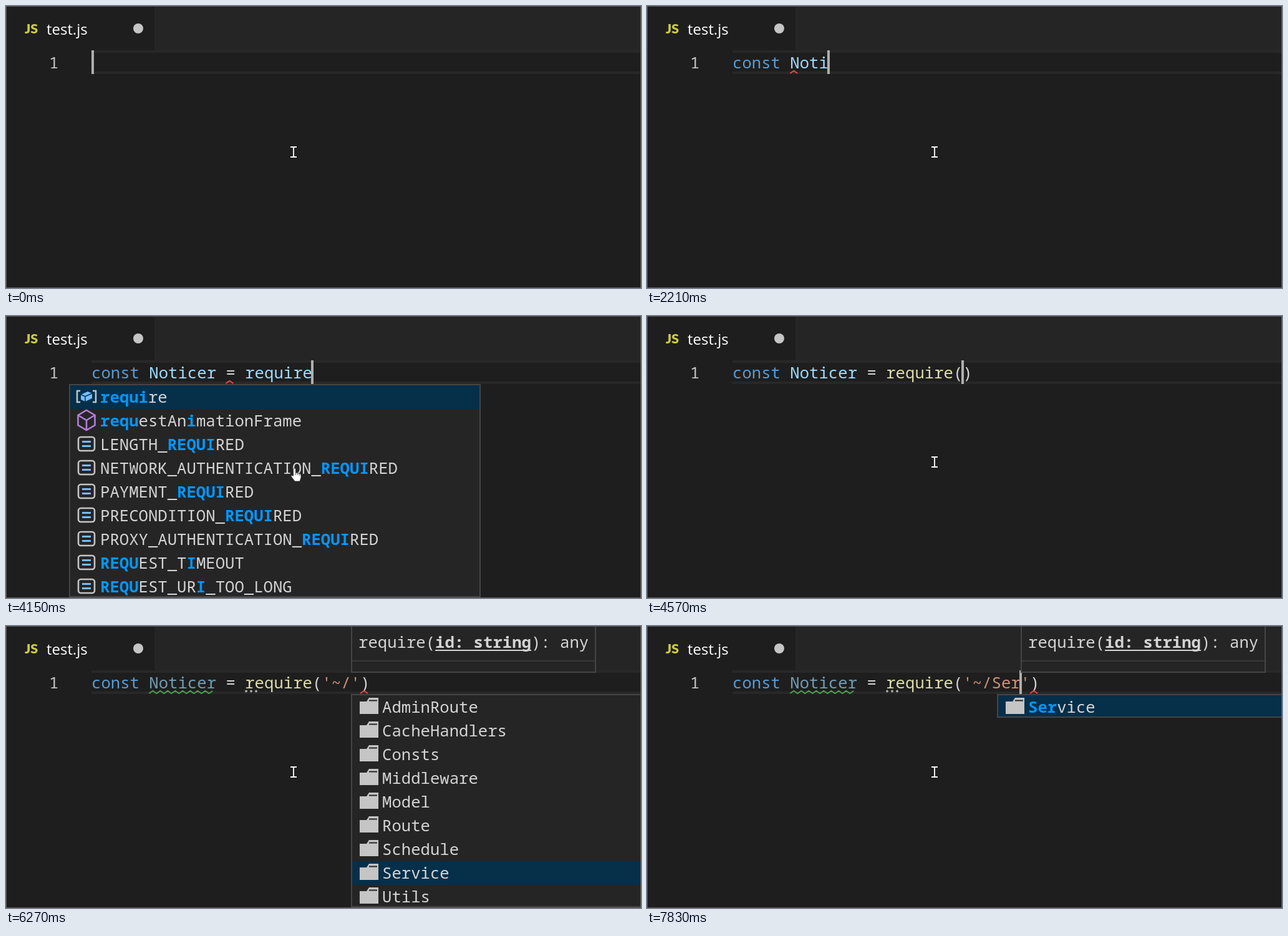
Write an HTML page that moves like this. It is 1018 px wide and 452 px high and loops after 8 s.

```html
<!DOCTYPE html>
<html lang="en">
<head>
<meta charset="utf-8">
<title>Editor completion</title>
<style>
  html, body { margin: 0; width: 100%; height: 100%; overflow: hidden; background: #1e1e1e; }
  svg { display: block; width: 1018px; height: 452px; }
  text { font: 25.65px "Noto Sans Mono", "Noto Sans CJK SC", monospace; white-space: pre; fill: #d4d4d4; }
  .title { font: 24px "Open Sans", "Noto Sans", sans-serif; fill: #fff; }
  .js { font: 900 21.5px Lato, sans-serif; fill: #cbcb41; }
  .mark { font-weight: 700; fill: #0097fb; }
  .param { font-weight: 700; }
  .cjk { font-size: 28px; }
  .line { fill: none; stroke: #c5c5c5; stroke-width: 3; }
</style>
</head>
<body>
<svg viewBox="0 0 1018 452">
  <rect width="1018" height="452" fill="#1e1e1e"/>
  <rect x="238" width="780" height="71" fill="#252526"/>
  <text class="js" x="30" y="43.5">JS</text>
  <text class="title" x="65" y="46">test.js</text>
  <circle cx="212" cy="36" r="8" fill="#c5c5c5"/>
  <path d="M137 73H1018M137 107H1018" stroke="#282828" stroke-width="4"/>
  <text x="69" y="100" style="fill:#c6c6c6">1</text>
  <g id="scene"></g>
  <rect x=".5" y=".5" width="1017" height="451" fill="none" stroke="#5c5c5c"/>
</svg>
<script>
const LOOP = 8000, CHAR = 15.39, ROW = 38, MAX_ROWS = 9, POPUP_WIDTH = 660;
const colX = col => 137 + col * CHAR;

// Each entry: icon letter, space, label
const keywords = ['E const', 'V console', 'E continue', 'M constructor', 'V confirm',
  'E catch', 'E class', 'M clearInterval', 'E case'];
const snippets = ['#endregion', '#region', 'define', 'dowhile', 'error', 'for', 'foreach',
  'forin', 'forof'].map(s => 'S ' + s);
const globals = ['V require', 'M requestAnimationFrame', ...['LENGTH_REQUIRED',
  'NETWORK_AUTHENTICATION_REQUIRED', 'PAYMENT_REQUIRED', 'PRECONDITION_REQUIRED',
  'PROXY_AUTHENTICATION_REQUIRED', 'REQUEST_TIMEOUT', 'REQUEST_URI_TOO_LONG'].map(s => 'E ' + s)];
const modules = ['F .git', 'F .vscode', 'F @/', 'F Log', 'F Migrations', 'F __test__',
  'B apidoc', 'J app', 'B assert'];
const folders = ['AdminRoute', 'CacheHandlers', 'Consts', 'Middleware', 'Model', 'Route',
  'Schedule', 'Service', 'Utils'].map(s => 'F ' + s);

const regionDocs = [[147, 'Folding Region E', '#9b9b9b'],
  [185, '<tspan class="cjk">功能</tspan>)', '#9b9b9b'], [255, '//#endregion', '#6a9955']];
const keywordDocs = [[147, 'const', '#9b9b9b']];
const requireDocs = [[147, 'var require: Nod', '#9b9b9b']];

const popup = (items, match = '', extra = {}) => ({ items, match, x: 101, sel: 0, ...extra });
const keywordPopup = (match, docs) => popup(keywords, match, { docs, hand: true });
const globalPopup = (match, docs) => popup(globals, match, { docs, hand: true });
const servicePopup = match => popup(['F Service'], match, { x: 561 });
const allFolders = popup(folders, '', { x: 553, sel: 7 });
const sFolders = popup(['F Schedule', 'F Service'], 'S', { x: 561, sel: 1 });

const head = 'const Noticer = ';
const call = path => head + `require('${path}|')`;
const late = { warn: true, faded: true };

// time, code with "|" as the caret, details (red: column of the error, sig: column of the hint)
const steps = [
  [0, '|'], [150, ''],
  [580, 'c|'],
  [714, 'c|', { list: keywordPopup('c') }],
  [849, 'co|', { list: keywordPopup('co') }],
  [983, 'con|', { list: keywordPopup('con') }],
  [1117, 'cons|', { list: keywordPopup('cons') }],
  [1252, 'const|', { list: keywordPopup('cons') }],
  [1386, 'const|', { list: keywordPopup('const') }],
  [1520, 'const|', { list: keywordPopup('const', keywordDocs) }],
  [1640, 'const |'],
  [1782, 'const N|'],
  [1925, 'const No|', { red: 6 }],
  [2067, 'const Not|', { red: 6 }],
  [2210, 'const Noti|', { red: 6 }],
  [2480, 'const Notic|', { red: 6 }],
  [2619, 'const Notice|', { red: 6 }],
  [2757, 'const Noticer|', { red: 6 }],
  [2896, 'const Noticer |', { red: 12 }],
  [3034, 'const Noticer =|', { red: 12 }],
  [3173, head + '|', { red: 12 }],
  [3311, head + '|', { red: 12, list: popup(snippets) }],
  [3450, head + '|', { red: 12, list: popup(snippets, '', { docs: regionDocs, scroll: true, hand: true }) }],
  [3580, head + 'r|', { red: 14, list: globalPopup('r') }],
  [3721, head + 're|', { red: 14, list: globalPopup('re') }],
  [3863, head + 'requ|', { red: 14, list: globalPopup('requ') }],
  [4004, head + 'requi|', { red: 14, list: globalPopup('requi') }],
  [4150, head + 'require|', { red: 14, list: globalPopup('requi') }],
  [4290, head + 'require|', { list: globalPopup('require') }],
  [4430, head + 'require|', { list: globalPopup('require', requireDocs) }],
  [4570, head + 'require(|)'],
  [4730, head + 'require(|)', { sig: 24, warn: true }],
  [4868, call(''), { sig: 24, warn: true }],
  [5006, call(''), { sig: 25, warn: true, red: 26 }],
  [5150, call(''), { sig: 25, warn: true, red: 26, list: popup(modules) }],
  [5282, call('~'), { sig: 26, warn: true, red: 27 }],
  [5420, call('~'), { sig: 26, red: 27, ...late }],
  [5720, call('~/'), { sig: 27, red: 28, ...late }],
  [5840, call('~/'), { sig: 27, red: 28, loading: true, ...late }],
  [6120, call('~/'), { sig: 27, red: 28, list: allFolders, ...late }],
  [6270, call('~/').replace('|', ''), { sig: 27, red: 28, list: allFolders, ...late }],
  [6580, call('~/S'), { sig: 28, red: 29, list: sFolders, ...late }],
  [7010, call('~/'), { sig: 27, red: 28, list: allFolders, ...late }],
  [7410, call('~/S'), { sig: 28, red: 29, list: sFolders, ...late }],
  [7550, call('~/S'), { sig: 28, red: 29, list: sFolders, ...late }],
  [7690, call('~/Se'), { sig: 29, red: 30, list: servicePopup('Se'), ...late }],
  [7830, call('~/Ser'), { sig: 30, red: 31, list: servicePopup('Ser'), ...late }],
];

const text = (x, y, body, fill = '#d4d4d4') => `<text x="${x}" y="${y}" style="fill:${fill}">${body}</text>`;
const rect = (x, y, w, h, fill) => `<rect x="${x}" y="${y}" width="${w}" height="${h}" fill="${fill}"/>`;
const panel = (x, y, w, h) => rect(x, y, w, h, '#454545') + rect(x + 2, y + 2, w - 4, h - 4, '#252526');

function tokenColor(token, rest, faded) {
  if (token === 'const') return '#569cd6';
  if (token[0] === "'") return '#ce9178';
  if (!/\w/.test(token)) return '#d4d4d4';
  if (rest[0] === '(') return '#dcdcaa';
  return faded ? '#729cb3' : '#9cdcfe';
}

function codeLine(code, faded) {
  return [...code.matchAll(/'[^']*'|\w+|\S/g)].map(({ 0: token, index }) =>
    text(colX(index), 100, token, tokenColor(token, code.slice(index + token.length), faded))).join('');
}

function squiggle(col, count, color) {
  const x = colX(col), end = x + count * CHAR;
  let d = `M${x} 108`;
  for (let i = 1; x + i * 6 < end; i++) d += `L${x + i * 6} ${i % 2 ? 104 : 108}`;
  return `<path d="${d}" fill="none" stroke="${color}" stroke-width="2"/>`;
}

// Icons are drawn around the middle of a row
const icons = {
  S: '<path class="line" d="M-13 9V-13H13V9"/><path class="line" d="M-14 13H15" stroke-dasharray="4 2.2"/>',
  V: '<path class="line" style="stroke-width:2.5" d="M-10-9H-15V9H-10M10-9H15V9H10"/>' +
     '<path fill="#75beff" d="M-9-3L2-8 9-5V3L-2 8-9 5Z"/><path d="M-9-3L-2 0 9-5M-2 0V8" fill="none" stroke="#062f4a" stroke-width="1.5"/>',
  M: '<path class="line" style="stroke:#b180d7;stroke-width:2.6" d="M0-16L13.5-8V8L0 16-13.5 8V-8ZM-13.5-8L0 0 13.5-8M0 0V16"/>',
  E: '<rect class="line" style="stroke-width:2.6" x="-13" y="-11" width="26" height="22" rx="4"/>' +
     '<path d="M-7-3.5H7M-7 3.5H7" stroke="#75beff" stroke-width="3"/>',
  F: '<path fill="#c5c5c5" d="M-14 12V-8H-3L1-14H16V12Z"/><path d="M1-9.5H14" stroke="#252526" stroke-width="2"/>',
  B: text(-17, 9, '{', '#c5c5c5') + text(1, 9, '}', '#c5c5c5'),
  J: '<text class="js" x="-12" y="7.5">JS</text>',
};

const contains = (label, match) => {
  let i = 0;
  for (const c of label.toLowerCase()) if (c === match[i]) i++;
  return i >= match.length;
};

// Marks the longest run first, then the remaining letters one by one
function highlight(label, match) {
  const low = label.toLowerCase(), marked = new Set();
  let len = match.length;
  while (len && !low.includes(match.slice(0, len))) len--;
  let pos = low.indexOf(match.slice(0, len));
  for (let i = 0; i < len; i++) marked.add(pos++);
  for (const c of match.slice(len)) {
    pos = low.indexOf(c, pos);
    marked.add(pos++);
  }
  return [...label].map((c, i) => marked.has(i) ? `<tspan class="mark">${c}</tspan>` : c).join('')
    .replaceAll('</tspan><tspan class="mark">', '');
}

function drawPopup({ items, match, x, sel, docs, scroll }) {
  const key = match.toLowerCase();
  const shown = items.filter(item => contains(item.slice(2), key)).slice(0, MAX_ROWS);
  const height = shown.length * ROW;
  let out = panel(x, 109, POPUP_WIDTH, height);
  out += rect(x + 2, 111 + sel * ROW, POPUP_WIDTH - 4, Math.min(ROW, height - 4 - sel * ROW), '#062f4a');
  shown.forEach((item, i) => {
    const mid = 130 + i * ROW;
    out += `<g transform="translate(${x + 28} ${mid - 1})">${icons[item[0]]}</g>`;
    out += text(x + 50, mid + 9, highlight(item.slice(2), key));
  });
  if (scroll) out += rect(x + 638, 111, 20, 260, 'rgba(121,121,121,.45)');
  if (docs) {
    out += panel(761, 109, 300, docs.at(-1)[0] - 89);
    out += docs.map(([y, body, fill]) => text(773, y, body, fill)).join('');
  }
  return out;
}

function signature(col) {
  const x = Math.round(136.7 + col * 15.4);
  return panel(x, -20, 393, 95) + rect(x + 2, 55, 389, 2, '#3a3a3a') +
    text(x + 12, 35, 'require(<tspan class="param">id: string</tspan>): any') +
    rect(x + 12 + 8 * CHAR, 38, 10 * CHAR, 2, '#d4d4d4');
}

const beam = '<path d="M456 226H460L461 227 462 226H466M461 227V241M456 242H460L461 241 462 242H466" fill="none" stroke="#fff" stroke-width="1.8"/>';
const hand = '<path d="M460.5 245q2-2.5 4 0V251l6 1.5q2.5.5 2.5 2.5v4l-2 6h-8l-6-8q0-3 3.5-.5z" fill="#fff" stroke="#1e1e1e" stroke-width=".8"/>' +
  '<path d="M464.5 251v4M467.4 252v3M470.2 253v3" stroke="#333" stroke-width=".8"/>';

function render([, source, { list, red, sig, warn, faded, loading } = {}]) {
  const caret = source.indexOf('|');
  let out = codeLine(source.replace('|', ''), faded);
  if (warn) out += squiggle(6, 7, '#4d9e4d');
  if (red !== undefined) out += squiggle(red, 1, '#f44747');
  if (faded) out += [385, 393, 401].map(x => `<circle cx="${x}" cy="104.5" r="1.9" fill="#a8a8a8"/>`).join('');
  if (caret >= 0) out += rect(Math.round(colX(caret)) - (caret ? 2 : 0), 71, 4, 38, '#aeafad');
  if (sig) out += signature(sig);
  if (list) out += drawPopup(list);
  if (loading) out += panel(553, 109, 200, ROW) + text(565, 137, 'Loading...');
  return out + (list && list.hand ? hand : beam);
}

const scene = document.getElementById('scene');
const start = performance.now();
let current;
function tick() {
  const time = (performance.now() - start) % LOOP;
  const step = steps.findLast(([at]) => at <= time);
  if (step !== current) scene.innerHTML = render(current = step);
  requestAnimationFrame(tick);
}
tick();
</script>
</body>
</html>
```
